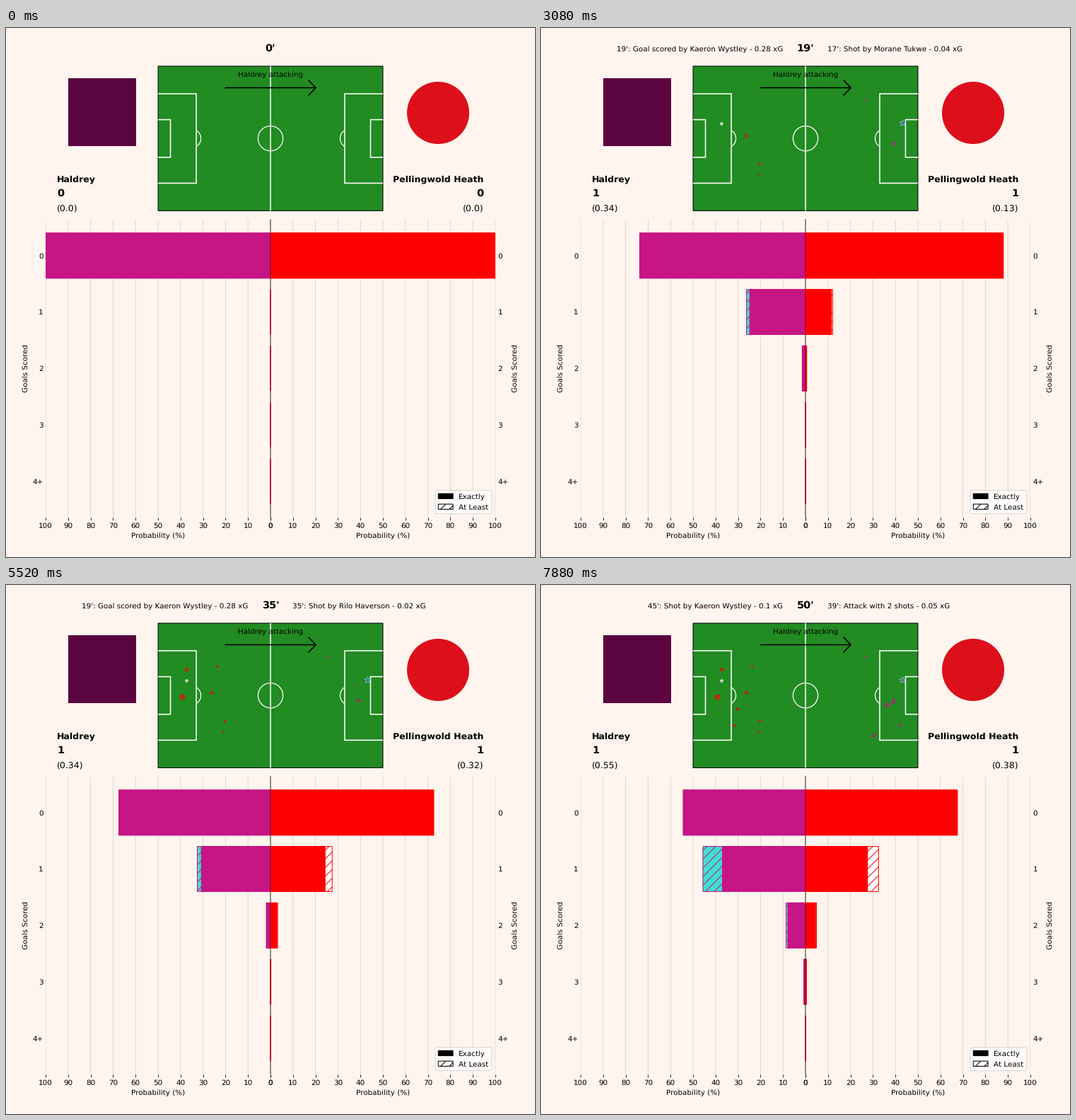
These frames come from a looping animation (748 by 748 pixels, 8000 ms). A matplotlib script:

```python
import numpy as np
import matplotlib.pyplot as plt
from matplotlib.animation import FuncAnimation
from matplotlib.patches import Arc, Circle, Patch, Rectangle

plt.rcParams.update({"path.snap": False, "text.hinting": "none"})

SIZE, DPI = 748, 74.8
FRAMES, INTERVAL = 250, 32
STEPS = 5  # tween steps in a minute with shots
HOME, AWAY = 0, 1
TEAMS = ("Haldrey", "Pellingwold Heath")
MAIN = ("mediumvioletred", "red")
SECOND = ("turquoise", "white")

# minute, side, description, is goal, shots as (xG, x, y)
EVENTS = [
    (4, AWAY, "Goal scored by Teskel Orrinde", True, [(.058, 255.3, 135)]),
    (12, AWAY, "Shot by Bohdaslan Zurevchyk", False, [(.01, 306.8, 207.8)]),
    (13, HOME, "Shot by Meridandroy Colvert", False, [(.01, 457.5, 101)]),
    (16, AWAY, "Shot by Rilo Haverson", False, [(.0175, 309.2, 191.8)]),
    (17, AWAY, "Shot by Morane Tukwe", False, [(.04, 290, 152.3)]),
    (19, HOME, "Shot by Meridandroy Colvert", False, [(.054, 498.5, 162.5)]),
    (19, HOME, "Goal scored by Kaeron Wystley", True, [(.28, 511, 134)]),
    (28, AWAY, "Shot by Morane Tukwe", False, [(.05, 255.3, 118.8)]),
    (31, AWAY, "Shot by Teskel Orrinde", False, [(.128, 249.5, 158.2)]),
    (35, AWAY, "Shot by Rilo Haverson", False, [(.02, 297.8, 115.3)]),
    (39, AWAY, "Attack with 2 shots", False,
     [(.03, 277.3, 174.8), (.025, 272.8, 198.3)]),
    (44, HOME, "Shot by Meridandroy Colvert", False, [(.05, 470, 212.8)]),
    (44, HOME, "Attack with 2 shots", False,
     [(.03, 498.5, 165.5), (.03, 507.5, 198)]),
    (45, HOME, "Shot by Kaeron Wystley", False, [(.098, 489.5, 169.3)]),
]
BUSY = {event[0] for event in EVENTS}
STARTS = np.cumsum([0] + [150 if m in BUSY else 160 for m in range(51)])


def chance(shots):
    """Probability that an attack ends in a goal."""
    return 1 - np.prod([1 - shot[0] for shot in shots])


def past(side, minute):
    return [e for e in EVENTS if e[1] == side and e[0] <= minute]


def goal_odds(side, minute):
    """Percentages of exactly and at least 0, 1, 2, 3, 4+ goals."""
    odds = np.array([1.0])
    for event in past(side, minute):
        p = chance(event[4])
        odds = np.convolve(odds, [1 - p, p])
    odds = np.pad(odds, (0, 5))
    exact = np.append(odds[:4], odds[4:].sum()) * 100
    least = exact[::-1].cumsum()[::-1]
    least[0] = exact[0]
    return np.array([exact, least])


fig = plt.figure(figsize=(SIZE / DPI, SIZE / DPI), dpi=DPI, facecolor="seashell")
stage = fig.add_axes([0, 0, 1, 1])
stage.set(xlim=(0, SIZE), ylim=(SIZE, 0))
stage.axis("off")


def label(x, y, text="", size=10, ha="center", weight="normal"):
    return stage.text(x, y, text, size=size, ha=ha, weight=weight,
                      va="baseline", zorder=5)


def line(xs, ys, color="white", width=1.5):
    stage.plot(xs, ys, color=color, lw=width, zorder=3,
               solid_capstyle="butt", solid_joinstyle="miter")


def draw_pitch():
    left, right, top, bottom = .2875 * SIZE, .7125 * SIZE, 54, 258.4
    mid_x, mid_y = SIZE / 2, (top + bottom) / 2
    stage.add_patch(Rectangle((left, top), right - left, bottom - top,
                              fc="forestgreen", ec="black", lw=1))
    line([mid_x, mid_x], [top, bottom])
    stage.add_patch(Circle((mid_x, mid_y), 17.6, fill=False, ec="white",
                           lw=1.2, zorder=3))
    for edge, way in ((left, 1), (right, -1)):
        for depth, half in ((54, 63.2), (17.5, 26.6)):
            x = edge + way * depth
            line([edge, x, x, edge],
                 [mid_y - half, mid_y - half, mid_y + half, mid_y + half])
        turn = 0 if way == 1 else 180
        stage.add_patch(Arc((edge + way * 47, mid_y), 27, 27, angle=turn,
                            theta1=-58, theta2=58, ec="white", lw=1.2, zorder=3))
    label(mid_x, 69, f"{TEAMS[HOME]} attacking")
    line([309.5, 438], [84.5, 84.5], "black")
    line([427.5, 438, 427.5], [73.5, 84.5, 95.5], "black")


def draw_shots():
    """Markers as (minute, step, artist); shots of a minute come one by one."""
    marks, seen = [], {}
    for minute, side, _, goal, shots in EVENTS:
        for xg, x, y in shots:
            step = seen.get((minute, side), 0)
            seen[minute, side] = step + 1
            dot = stage.scatter(
                x, y, s=300 * xg, marker="*" if goal else "o",
                color=MAIN[side], edgecolor=SECOND[side] if goal else MAIN[side],
                lw=1 if goal else 1.2, alpha=.85 if goal else .65, zorder=4)
            marks.append((minute, step, dot))
    return marks


def draw_bars(side):
    ax = fig.add_axes([(.075, .5)[side], .075, .425, .563], facecolor="none")
    rows = range(5)
    least = ax.barh(rows, 0, fc=SECOND[side], ec=MAIN[side], hatch="//", lw=1)
    exact = ax.barh(rows, 0, fc=MAIN[side], ec=MAIN[side], lw=1)
    ax.set(xlim=(100, 0) if side == HOME else (0, 100), ylim=(4.64, -.64),
           xticks=range(0, 101, 10), xlabel="Probability (%)",
           ylabel="Goals Scored")
    ax.set_yticks(rows, ["0", "1", "2", "3", "4+"])
    ax.tick_params(axis="y", length=0)
    ax.grid(axis="x", color="grey", alpha=.3, lw=.8)
    ax.set_axisbelow(True)
    for name, spine in ax.spines.items():
        spine.set_visible(side == HOME and name == "right")
    if side == AWAY:
        ax.yaxis.tick_right()
        ax.yaxis.set_label_position("right")
        ax.tick_params(axis="y", length=0)
        ax.legend(handles=[
            Patch(fc="black", ec="black", label="Exactly"),
            Patch(fc="white", ec="black", hatch="//", label="At Least"),
        ], loc="lower right")
    return exact, least


draw_pitch()
stage.add_patch(Rectangle((88, 71), 96, 96, color="#5b0540", lw=0))
stage.add_patch(Circle((611, 120), 44, color="#dd0f1b", lw=0))
marks = draw_shots()
bars = [draw_bars(side) for side in (HOME, AWAY)]
clock = label(374, 33, size=14, weight="bold")
news = [label(342, 33, ha="right"), label(405.5, 33, ha="left")]
scores, totals = [], []
for x, ha, team in ((72, "left", TEAMS[0]), (675.8, "right", TEAMS[1])):
    label(x, 217.5, team, 12, ha, "bold")
    scores.append(label(x, 238, size=14, ha=ha, weight="bold"))
    totals.append(label(x, 258, size=12, ha=ha))


def update(i):
    t = i * INTERVAL + 28
    minute = int(np.searchsorted(STARTS, t, side="right")) - 1
    step = min(STEPS - 1, (t - STARTS[minute]) // 30)
    clock.set_text(f"{minute}'")

    for side in (HOME, AWAY):
        events = past(side, minute)
        xg = sum(shot[0] for e in events for shot in e[4])
        scores[side].set_text(str(sum(e[3] for e in events)))
        totals[side].set_text(f"({round(float(xg), 2)})")
        text = ""
        if events:
            when, _, what, _, shots = events[-1]
            text = f"{when}': {what} - {round(float(chance(shots)), 2)} xG"
        news[side].set_text(text)

        before, after = goal_odds(side, minute - 1), goal_odds(side, minute)
        widths = before + (after - before) * (step + 1) / STEPS
        for group, values in zip(bars[side], widths):
            for bar, value in zip(group, values):
                bar.set_width(value)

    for when, order, dot in marks:
        dot.set_visible((when, order) <= (minute, step))
    return []


anim = FuncAnimation(fig, update, frames=FRAMES, interval=INTERVAL,
                     init_func=lambda: update(0), repeat=True, repeat_delay=0)
plt.show()
```
